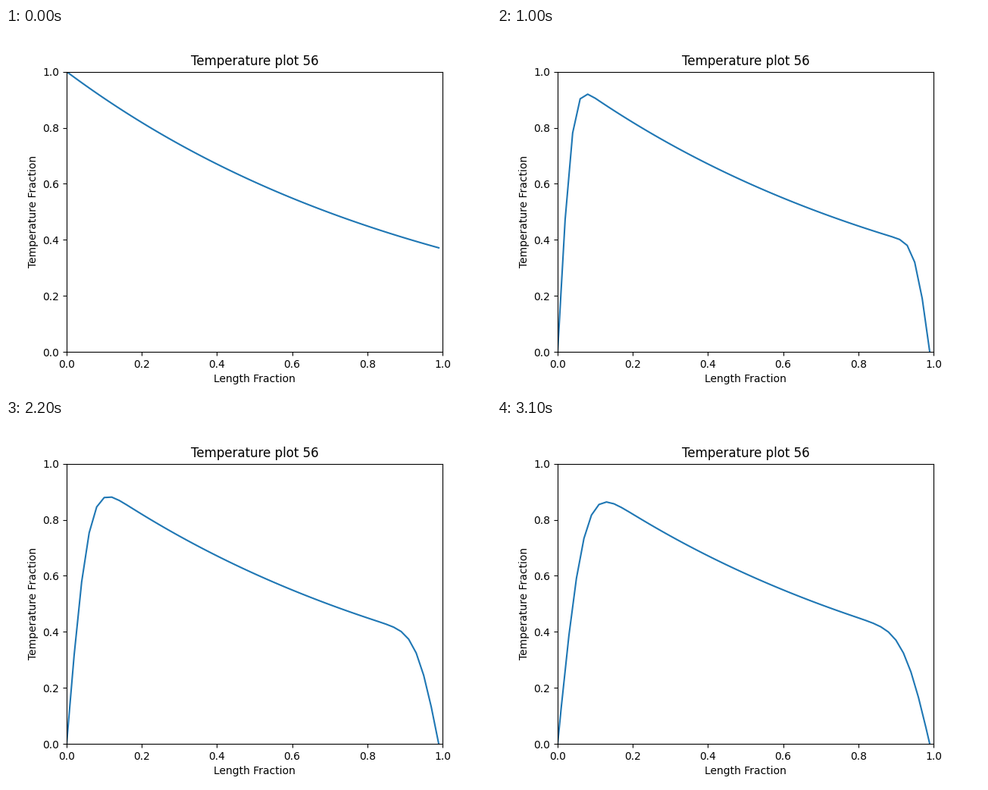
Animation, 640 px wide and 480 px high, one loop 3200 ms. Source, as a matplotlib script:

```python
import matplotlib.pyplot as plt
import numpy as np
from matplotlib.animation import FuncAnimation

FRAMES = 32
INTERVAL = 100  # ms
POINTS = 100


def step(temp):
    """Explicit heat step with r = 1/2 and both ends held at zero."""
    new = np.zeros_like(temp)
    new[1:-1] = (temp[:-2] + temp[2:]) / 2
    return new


x = np.arange(POINTS) / POINTS
profiles = [np.exp(-x)]
for _ in range(FRAMES - 1):
    profiles.append(step(profiles[-1]))

fig, ax = plt.subplots(figsize=(6.4, 4.8), dpi=100)
ax.set(
    xlim=(0, 1),
    ylim=(0, 1),
    title="Temperature plot 56",
    xlabel="Length Fraction",
    ylabel="Temperature Fraction",
)
line, = ax.plot(x, profiles[0], color="tab:blue", lw=1.5)


def update(frame):
    line.set_ydata(profiles[frame])
    return line,


anim = FuncAnimation(fig, update, frames=FRAMES, interval=INTERVAL,
                     repeat=True, repeat_delay=0, blit=False)

plt.show()
```
